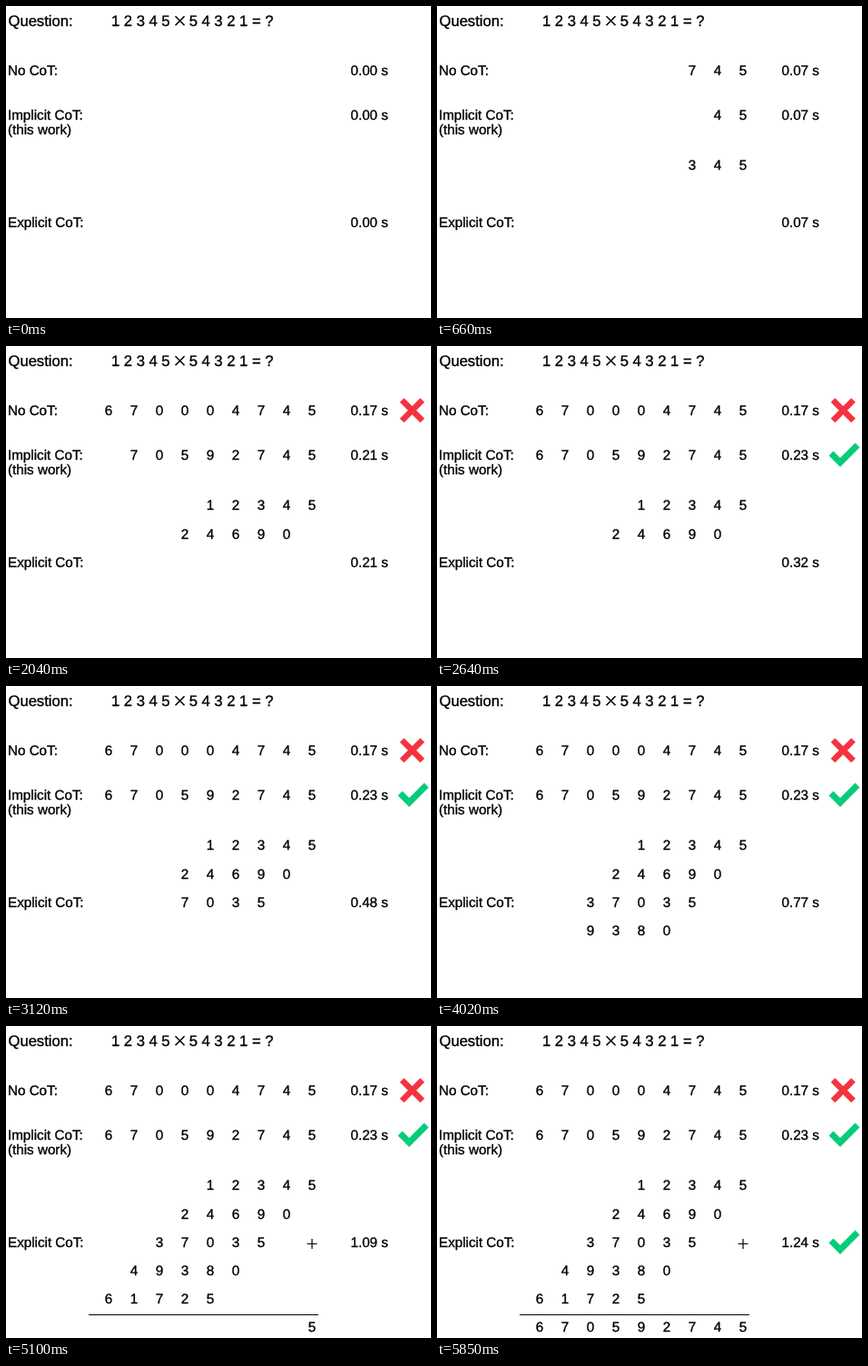
An HTML page for the animation above (6390 ms loop, 468 px wide and 343 px high).

```html
<!DOCTYPE html>
<html lang="en">
<head>
<meta charset="utf-8">
<title>Multiplication race</title>
<style>
  html, body { margin: 0; width: 100%; height: 100%; overflow: hidden; background: #fff; }
  svg { display: block; width: 468px; height: 343px; }
  text {
    font: 15.2px "Liberation Sans", Arial, sans-serif;
    fill: #000; stroke: #000; stroke-width: 0.35px; white-space: pre;
    text-rendering: geometricPrecision;
  }
  .big { font-size: 16.6px; }
  .digit { text-anchor: middle; }
  .ink { stroke: #000; fill: none; }
  .tick { stroke: #05cc78; stroke-width: 7; fill: none; }
  .cross { stroke: #f5333f; stroke-width: 6.7; fill: none; }
</style>
</head>
<body>
<svg id="stage" viewBox="0 0 468 343"></svg>
<script>
const LOOP = 6390;
const STEP = 690 / 14;      // refresh interval of the fast part
const stage = document.getElementById("stage");

function add(tag, attrs, content = "") {
  const el = document.createElementNS("http://www.w3.org/2000/svg", tag);
  for (const key in attrs) el.setAttribute(key, attrs[key]);
  el.textContent = content;
  stage.appendChild(el);
  return el;
}
const label = (x, y, content, cls = "") => add("text", { x, y, class: cls }, content);
const path = (d, cls) => add("path", { d, class: cls });
const show = (el, on) => el.setAttribute("visibility", on ? "visible" : "hidden");

label(2.5, 22, "Question:", "big");
label(116, 21.5, "1 2 3 4 5", "big");
path("M186.5 11.2L196.5 21.2M196.5 11.2L186.5 21.2", "ink").setAttribute("stroke-width", 1.6);
label(201.7, 21.5, "5 4 3 2 1 = ?", "big");
label(2, 76, "No CoT:");
label(2, 125, "Implicit CoT:");
label(2, 140.5, "(this work)");
label(2, 243, "Explicit CoT:");

const clocks = [76, 125, 243].map(y => label(379.5, y, ""));
const limits = [17, 23, 124];

// Digits fill each row from the right; `due` is in hundredths of a second.
const digits = [];
function row(number, right, y, due) {
  [...number].reverse().forEach((d, i) => {
    digits.push({ el: label(right - 28 * i, y, d, "digit"), due: due(i) });
  });
}
row("670004745", 337, 76, i => (i + 1) * 17 / 9);
row("670592745", 337, 125, i => (i + 1) * 23 / 9);

const TOKEN = 1.907;
const explicitRows = [
  ["12345", 1], ["24690", 7], ["37035", 22],
  ["49380", 37], ["61725", 52], ["670592745", 57]
];
explicitRows.forEach(([number, start], r) => {
  const right = r < 5 ? 337 - 28 * r : 337;
  row(number, right, 180.3 + 31.2 * r, i => (start + i) * TOKEN);
});

const sum = path("M331.5 239.5H342.5M337 234V245M91 317.5H344", "ink");
sum.setAttribute("stroke-width", 1.2);

const cross = path("M436 59.5L458.5 82M458.5 59.5L436 82", "cross");
const tickAt = y => path(`M434 ${y + 12}L444 ${y + 22}L463 ${y + 3}`, "tick");
const implicitTick = tickAt(106);
const explicitTick = tickAt(224);

// Elapsed hundredths: slow start, fast middle, gentler finish.
function hundredths(t) {
  if (t < 60) return 0;
  if (t < 2385) return Math.min(23, Math.floor(1 + (t - 60) / 98.5));
  const fast = 24 + (t - 2385) / 30.6;
  const late = 124 - (5840 - t) / 50;
  return Math.min(124, Math.floor(Math.min(fast, late)));
}

function snap(t) {
  const q = Math.floor(t / 30) * 30;
  if (q < 2790) return q;
  return 2790 + Math.floor((q + 16 - 2790) / STEP) * STEP;
}

function draw(t) {
  const n = hundredths(snap(t));
  clocks.forEach((el, i) => {
    el.textContent = (Math.min(n, limits[i]) / 100).toFixed(2) + " s";
  });
  digits.forEach(d => show(d.el, n >= d.due));
  show(sum, n >= 56 * TOKEN);
  show(cross, t >= 1680);
  show(implicitTick, t >= 2280);
  show(explicitTick, t >= 5850);
}

const start = performance.now();
function frame() {
  draw((performance.now() - start) % LOOP);
  requestAnimationFrame(frame);
}
draw(0);
requestAnimationFrame(frame);
</script>
</body>
</html>
```
